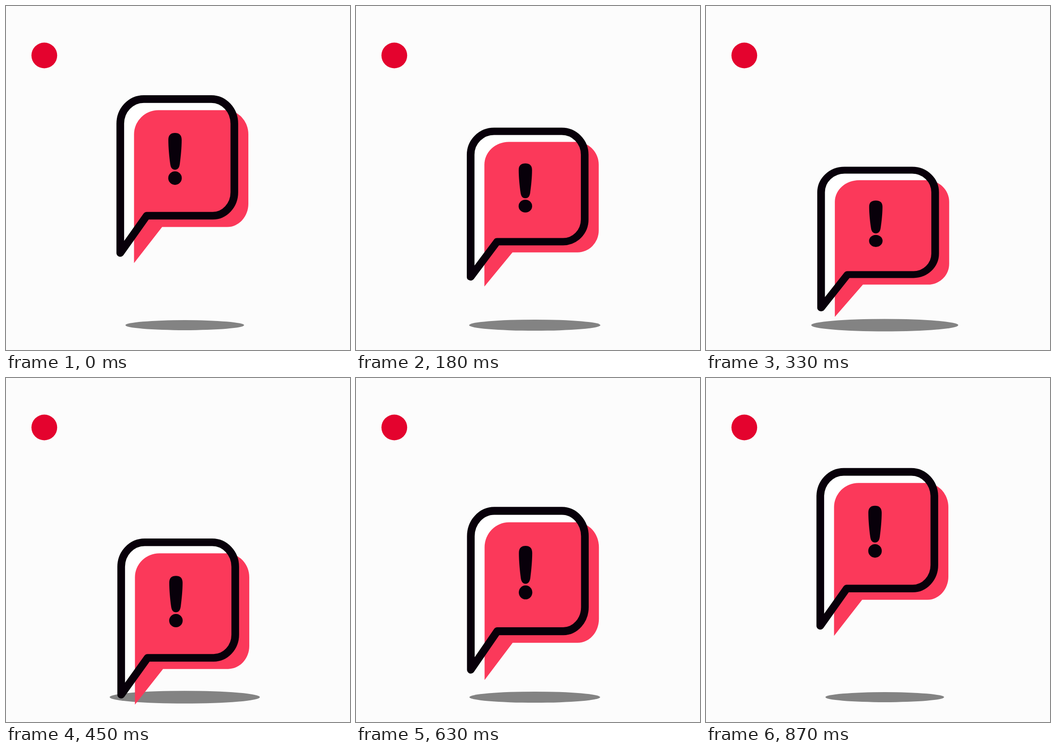
These frames come from a looping animation (748 by 748 pixels, 0.9 s). An HTML page:

```html
<!DOCTYPE html>
<html lang="en">
<head>
<meta charset="utf-8">
<title>Bouncing alert bubble</title>
<style>
  html, body { margin: 0; width: 100%; height: 100%; overflow: hidden; background: #fcfcfc; }
  svg { display: block; width: 100%; height: 100%; }
</style>
</head>
<body>
<svg viewBox="0 0 748 748">
  <defs>
    <path id="frame" d="M248.5 537V256A51 53.7 0 0 1 299.5 202.3H446.5A50 53.7 0 0 1 496.500 256V405A47 51 0 0 1 449.500 456H306Z"/>
  </defs>
  <circle cx="83.3" cy="107.5" r="28" fill="#e4032e"/>
  <ellipse id="shadow" cx="388.7" cy="694" fill="#838383"/>
  <g id="bubble">
    <use href="#frame" fill="#fff"/>
    <path fill="#fb395a" d="M278.4 559V279A53 52.5 0 0 1 331.4 226.5H478A49 52.5 0 0 1 527 279V430A46 50.5 0 0 1 481 480.5H339.5Z"/>
    <use href="#frame" fill="none" stroke="#08000a" stroke-width="16.7" stroke-linejoin="round"/>
    <g fill="#08000a">
      <path d="M353 291C353 280 359 276 367.5 276S382 280 382 291C382 308 380 328 378 343C377 351 374 356 367.5 356S358 351 357 343C355 328 353 308 353 291Z"/>
      <circle cx="367.5" cy="374.2" r="14.7"/>
    </g>
  </g>
</svg>
<script>
  const LOOP = 900, STEP = 30, PIVOT = 373;
  const shadow = document.getElementById('shadow');
  const bubble = document.getElementById('bubble');

  // Keys are [time, value] pairs, eased in and out between neighbours.
  const drop = [[0, 0], [420, 1], [900, 0]];
  const stretch = [[0, 1], [360, 0.892], [510, 1.0425], [870, 1]];
  const spread = [[0, 129], [420, 164], [780, 129]];

  function valueAt(keys, t) {
    const i = keys.findIndex(key => key[0] > t);
    if (i < 0) return keys[keys.length - 1][1];
    const [t0, v0] = keys[i - 1], [t1, v1] = keys[i];
    const x = (t - t0) / (t1 - t0);
    return v0 + (v1 - v0) * x * x * (3 - 2 * x);
  }

  function draw(now) {
    const t = Math.floor(now % LOOP / STEP) * STEP;
    const fall = valueAt(drop, t);
    const rx = valueAt(spread, t);
    bubble.setAttribute('transform',
      `translate(${2 * fall} ${PIVOT + 155 * fall}) scale(1 ${valueAt(stretch, t)}) translate(0 ${-PIVOT})`);
    shadow.setAttribute('rx', rx);
    shadow.setAttribute('ry', rx * 0.0848);
    requestAnimationFrame(draw);
  }
  draw(performance.now());
</script>
</body>
</html>
```
